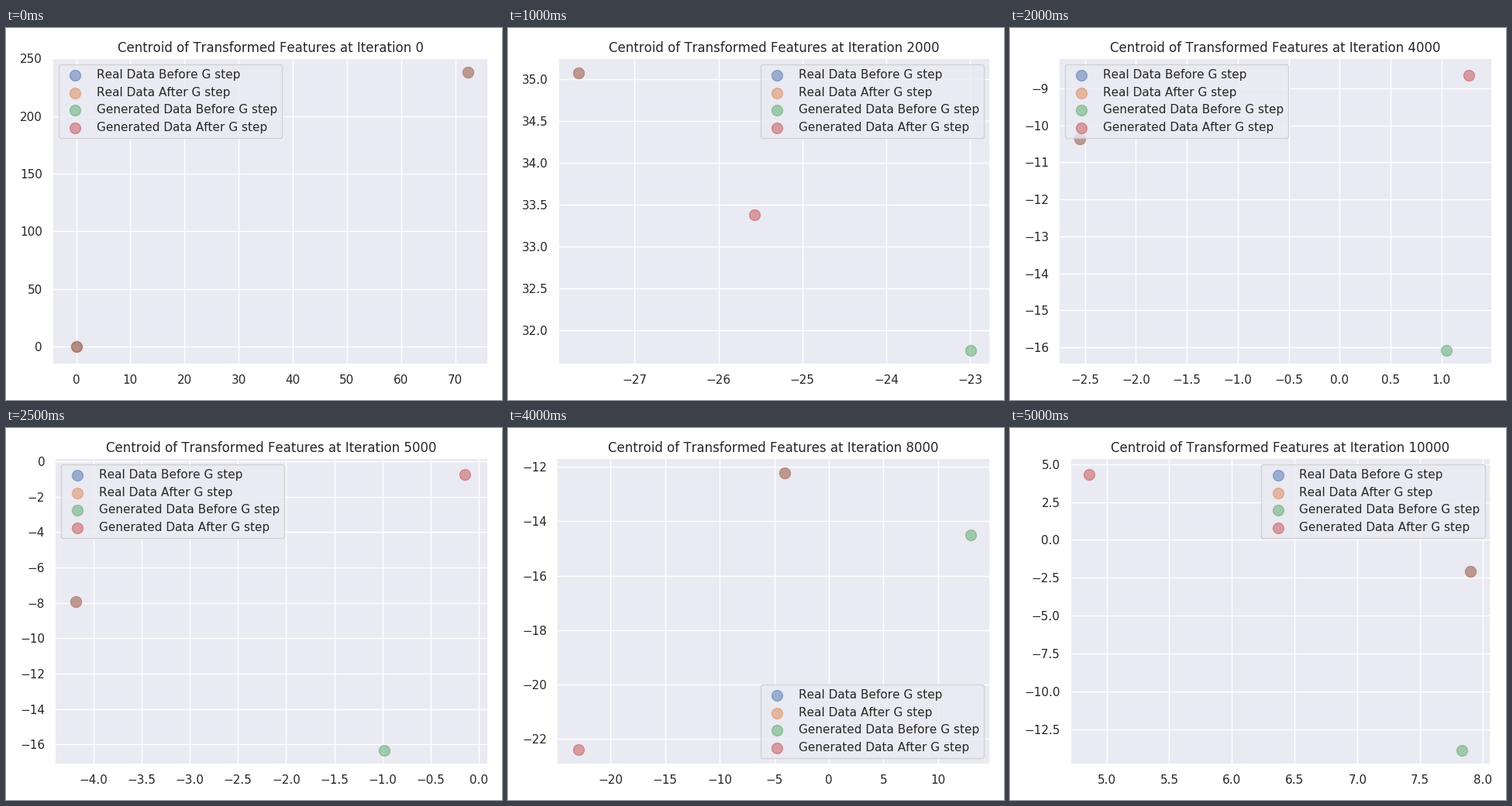
Animation of 640 by 480 pixels, one loop 5500 ms. Source, as a matplotlib script:

```python
import matplotlib.pyplot as plt
import numpy as np
from matplotlib.animation import FuncAnimation

plt.rcParams.update({
    "font.family": "DejaVu Sans", "font.size": 12, "text.color": ".15",
    "text.kerning_factor": 6,
    "axes.facecolor": "#EAEAF2", "axes.edgecolor": "white",
    "axes.linewidth": 1.25, "axes.titlesize": 12, "axes.axisbelow": True,
    "axes.grid": True, "grid.color": "white", "grid.linewidth": 1,
    "lines.solid_capstyle": "round", "legend.fontsize": 11,
    "xtick.bottom": False, "ytick.left": False,
    "xtick.major.size": 6, "ytick.major.size": 6,
    "xtick.color": ".15", "ytick.color": ".15",
    "xtick.labelsize": 11, "ytick.labelsize": 11,
})

LABELS = [f"{kind} Data {when} G step"
          for kind in ("Real", "Generated") for when in ("Before", "After")]
COLORS = ["#4C72B0", "#DD8452", "#55A868", "#C44E52"]

# Centroids by step: real data, generated before and generated after
CENTROIDS = {
    0: [(72.4, 238), (0, 0), (0, 0)],
    1: [(-40.826, 66.824), (-38.006, 61.56), (-38.186, 61.886)],
    3: [(-14.5, 3.312), (-7.99, 1.968), (-12.955, 4.878)],
    4: [(-2.552, -10.354), (1.05, -16.08), (1.268, -8.64)],
    6: [(-5.819, -5.47), (-3.018, -16.57), (-1.549, 7.17)],
    8: [(-4.06, -12.207), (12.96, -14.51), (-22.92, -22.38)],
    10: [(7.901, -2.07), (7.833, -13.89), (4.864, 4.31)],
}
KEYS = list(CENTROIDS)
TRACKS = np.array(list(CENTROIDS.values())).reshape(len(KEYS), -1).T


def centroids(step):
    real, before, after = np.reshape(
        [np.interp(step, KEYS, track) for track in TRACKS], (3, 2))
    return np.array([real, real, before, after])


def autoscale(values, pixels, radius=5, margin=0.05):
    """Grow the view marker by marker, sizing each in the view so far."""
    view, low, high = (0, 1), np.inf, -np.inf
    for value in values:
        r = radius * (view[1] - view[0]) / pixels
        low, high = min(low, value - r), max(high, value + r)
        pad = margin * (high - low)
        view = low - pad, high + pad
    return view


fig = plt.figure(figsize=(6.4, 4.8), dpi=100)


def draw(step):
    points = centroids(step)
    fig.clear()
    ax = fig.add_subplot()
    for point, color, label in zip(points, COLORS, LABELS):
        ax.scatter(*point, s=100, color=color, alpha=0.5, label=label)
    width, height = ax.bbox.size
    ax.set(xlim=autoscale(points[:, 0], width),
           ylim=autoscale(points[:, 1], height),
           title=f"Centroid of Transformed Features at Iteration {step * 1000}")
    ax.legend(loc="best")
    fig.tight_layout(rect=(0, 0, 1, 1.0025))
    return []


anim = FuncAnimation(fig, draw, frames=11, interval=500, repeat=True)
plt.show()
```
